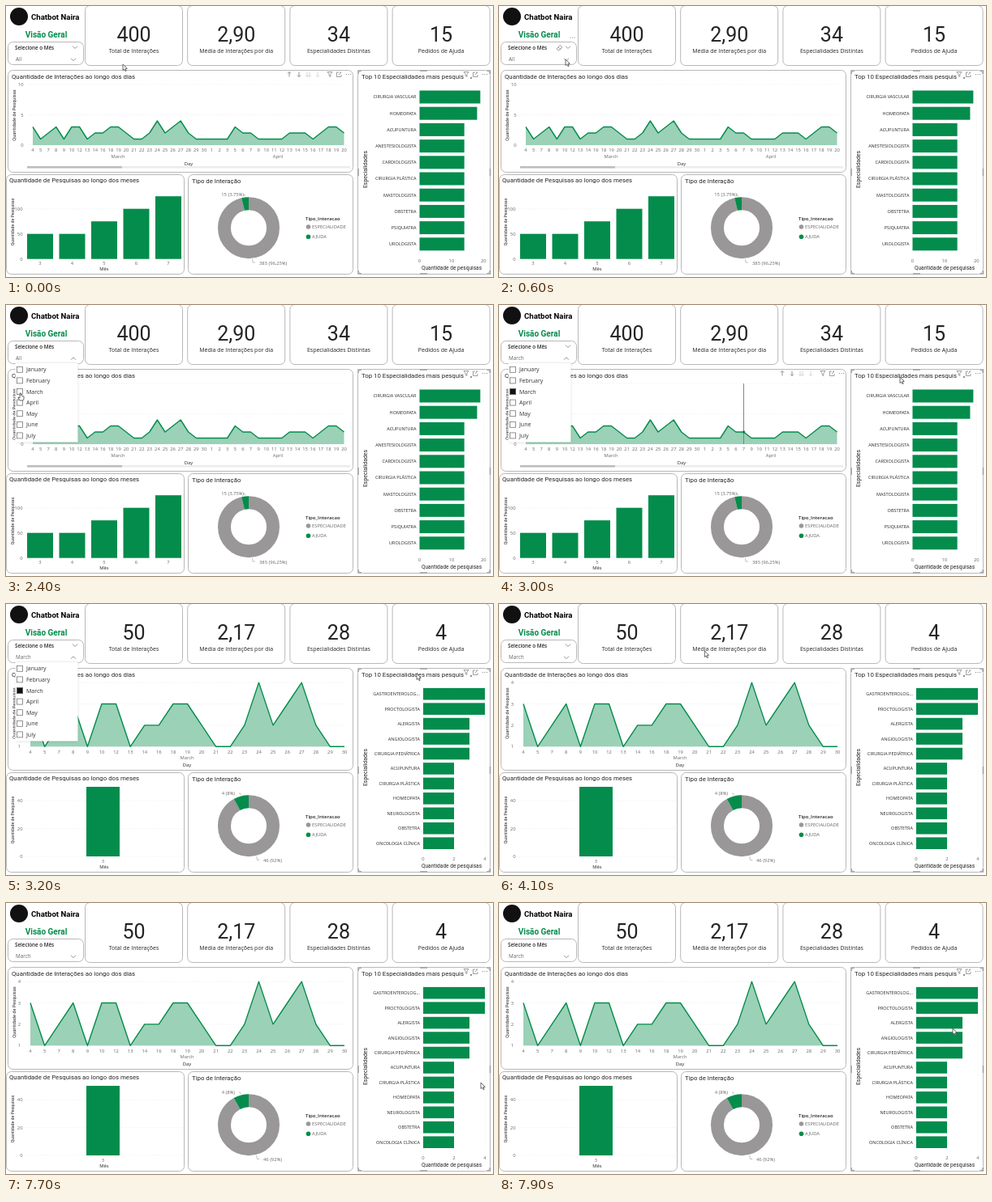
These frames come from a looping animation (600 by 335 pixels, 8000 ms). An HTML page with a canvas:

```html
<!DOCTYPE html>
<html lang="pt">
<head>
<meta charset="utf-8">
<title>Painel</title>
<style>
html, body { margin: 0; width: 100%; height: 100%; overflow: hidden; background: #fff; }
canvas { display: block; width: 600px; height: 335px; }
</style>
</head>
<body>
<canvas id="stage"></canvas>
<script>
const LOOP = 8000, STEP = 100;
const GREEN = '#048c4c', GREY = '#999797', INK = '#252423', SOFT = '#666', ICON = '#777';
const SANS = '"Open Sans", sans-serif', DIN = 'Roboto, sans-serif';
const canvas = document.getElementById('stage');
const ctx = canvas.getContext('2d');
const ratio = window.devicePixelRatio || 1;
canvas.width = 600 * ratio;
canvas.height = 335 * ratio;

const marchDays = [4, 5, 7, 8, 9, 10, 12, 13, 14, 16, 18, 19, 20, 21, 22, 23, 24, 25, 26, 27, 28, 29, 30];
const aprilDays = [1, 2, 3, 5, 6, 7, 9, 10, 11, 12, 13, 14, 15, 16, 17, 18, 19, 20];
const marchCounts = [...'31231331223321124234211'].map(Number);
const aprilCounts = [...'111322111122212332'].map(Number);
const months = ['January', 'February', 'March', 'April', 'May', 'June', 'July'];

const allData = {
  cards: ['400', '2,90', '34', '15'],
  days: [...marchDays, ...aprilDays], counts: [...marchCounts, ...aprilCounts],
  line: { x0: 33, x1: 416.5, base: 172, unit: 7.5, min: 0, ticks: [0, 5, 10], tickX: 21.5, dayY: 178.3, monthY: 186.3, titleY: 195, titleX: 225 },
  monthNames: [['March', 138], ['April', 335]],
  columns: { base: 312.7, unit: 0.62, ticks: [0, 50, 100], width: 32, centers: [42, 81.5, 121, 160.5, 200], values: [50, 50, 75, 100, 125] },
  help: 0.0375, helpLabel: ['15 (3,75%)', 294, 232.7], otherLabel: ['385 (96,25%)', 312, 317.5],
  bars: { x: 509.5, unit: 3.94, y: 112.5, pitch: 20.2, height: 16, ticks: [0, 10, 20], values: [19, 18, 14, 14, 14, 14, 14, 14, 14, 14],
    names: ['CIRURGIA VASCULAR', 'HOMEOPATA', 'ACUPUNTURA', 'ANESTESIOLOGISTA', 'CARDIOLOGISTA', 'CIRURGIA PLÁSTICA', 'MASTOLOGISTA', 'OBSTETRA', 'PSIQUIATRA', 'UROLOGISTA'] }
};
const marchData = {
  cards: ['50', '2,17', '28', '4'],
  days: marchDays, counts: marchCounts,
  line: { x0: 30, x1: 417, base: 176.3, unit: 26.4, min: 1, ticks: [1, 2, 3, 4], tickX: 18, dayY: 183, monthY: 190, titleY: 199, titleX: 223 },
  monthNames: [['March', 223]],
  columns: { base: 312, unit: 1.72, ticks: [0, 20, 40], width: 41, centers: [119.5], values: [50] },
  help: 0.08, helpLabel: ['4 (8%)', 283, 233.5], otherLabel: ['46 (92%)', 317, 317],
  bars: { x: 514, unit: 19, y: 111.2, pitch: 18.45, height: 14.6, ticks: [0, 2, 4], values: [4, 4, 3, 3, 3, 2, 2, 2, 2, 2, 2],
    names: ['GASTROENTEROLOG...', 'PROCTOLOGISTA', 'ALERGISTA', 'ANGIOLOGISTA', 'CIRURGIA PEDIÁTRICA', 'ACUPUNTURA', 'CIRURGIA PLÁSTICA', 'HOMEOPATA', 'NEUROLOGISTA', 'OBSTETRA', 'ONCOLOGIA CLÍNICA'] }
};

// y is the middle of the capital letters
function text(str, x, y, size, { color = INK, align = 'left', weight = 400, font = SANS } = {}) {
  ctx.font = `${weight} ${size}px ${font}`;
  ctx.fillStyle = color;
  ctx.textAlign = align;
  ctx.fillText(str, x, y + size * 0.36);
}
function sideText(str, x, y, size) {
  ctx.save();
  ctx.translate(x, y);
  ctx.rotate(-Math.PI / 2);
  text(str, 0, 0, size, { align: 'center', font: DIN });
  ctx.restore();
}
const title = (str, x, y) => text(str, x, y, 7.8, { font: DIN });
const tick = (str, x, y, align = 'center') => text(str, x, y, 5.8, { color: SOFT, align });

function rect(x, y, w, h, color) {
  ctx.fillStyle = color;
  ctx.fillRect(x, y, w, h);
}
function path(points, color, width = 0.8) {
  ctx.beginPath();
  points.forEach(([x, y]) => ctx.lineTo(x, y));
  ctx.strokeStyle = color;
  ctx.lineWidth = width;
  ctx.stroke();
}
function disc(x, y, r, color) {
  ctx.beginPath();
  ctx.arc(x, y, r, 0, Math.PI * 2);
  ctx.fillStyle = color;
  ctx.fill();
}
function panel(x0, y0, x1, y1) {
  ctx.beginPath();
  ctx.roundRect(x0 + 0.5, y0 + 0.5, x1 - x0, y1 - y0, 6);
  ctx.fillStyle = '#fff';
  ctx.fill();
  ctx.strokeStyle = '#b8b8b8';
  ctx.lineWidth = 1;
  ctx.stroke();
}
function grid(points) {
  ctx.setLineDash([1, 2]);
  path(points, '#e8e8e8', 0.7);
  ctx.setLineDash([]);
}
function chevron(x, y, up = false) {
  const d = up ? -1.5 : 1.5;
  path([[x - 3, y - d], [x, y + d], [x + 3, y - d]], ICON, 0.8);
}
function arrow(x, dir, color) {
  path([[x, 81.5], [x, 87.5]], color);
  path([[x - 2, 84.5 + dir], [x, 84.5 + dir * 3], [x + 2, 84.5 + dir]], color);
}
function dots(x, y) {
  for (const d of [-2.6, 0, 2.6]) disc(x + d, y, 0.6, ICON);
}
function visualIcons(x) {
  path([[x - 3, 81.5], [x + 3, 81.5], [x + 0.8, 84.5], [x + 0.8, 87.5], [x - 0.8, 86.5], [x - 0.8, 84.5], [x - 3, 81.5]], ICON, 0.7);
  path([[x + 11, 82], [x + 8.5, 82], [x + 8.5, 87.5], [x + 14, 87.5], [x + 14, 85]], ICON, 0.7);
  path([[x + 11, 85], [x + 14, 82], [x + 12, 82]], ICON, 0.7);
  dots(x + 23, 84.5);
}

function drawCards(values) {
  const labels = ['Total de Interações', 'Média de Interações por dia', 'Especialidades Distintas', 'Pedidos de Ajuda'];
  labels.forEach((label, i) => {
    const x = 157.5 + i * 126.2;
    panel(x - 60.5, -1, x + 59.5, 73);
    text(values[i], x, 35.3, 25, { align: 'center', font: DIN });
    text(label, x, 55.3, 7, { align: 'center' });
  });
}

function drawLine(data, hover) {
  const { x0, x1, base, unit, min, ticks, tickX, dayY, monthY, titleX, titleY } = data.line;
  panel(2, 79, 427, 205);
  title('Quantidade de Interações ao longo dos dias', 7, 86.7);
  sideText('Quantidade de Pesquisas', 9.5, 135, 5.6);
  const xAt = i => x0 + i * (x1 - x0) / (data.days.length - 1);
  const yAt = v => base - (v - min) * unit;
  for (const v of ticks) {
    grid([[x0 - 5, yAt(v)], [x1 + 4, yAt(v)]]);
    tick(v, tickX, yAt(v), 'right');
  }
  const points = data.counts.map((v, i) => [xAt(i), yAt(v)]);
  ctx.beginPath();
  [[x0, base], ...points, [x1, base]].forEach(([x, y]) => ctx.lineTo(x, y));
  ctx.fillStyle = '#9bd1b7';
  ctx.fill();
  ctx.lineJoin = 'round';
  path(points, GREEN, 1.4);
  ctx.lineJoin = 'miter';
  data.days.forEach((d, i) => tick(d, xAt(i), dayY));
  data.monthNames.forEach(([name, x]) => tick(name, x, monthY));
  text('Day', titleX, titleY, 5.8, { align: 'center' });
  if (!min) {
    for (const [end, color] of [[424, '#ececec'], [143, '#bdbdbd']])
      path([[26, 199.3], [end, 199.3]], color, 2.4);
  }
  if (hover) {
    arrow(349, -1, ICON);
    arrow(361, 1, ICON);
    arrow(371, 1, '#ccc');
    arrow(374, 1, '#ccc');
    arrow(384, 1, '#ccc');
    visualIcons(399);
  }
}

function drawColumns({ base, unit, ticks, width, centers, values }) {
  panel(0, 208, 219, 331);
  title('Quantidade de Pesquisas ao longo dos meses', 4, 215.3);
  sideText('Quantidade de Pesquisas', 8.5, 267, 5.2);
  for (const v of ticks) {
    grid([[24, base - v * unit], [217, base - v * unit]]);
    tick(v, 20.5, base - v * unit, 'right');
  }
  values.forEach((v, i) => {
    rect(centers[i] - width / 2, base - v * unit, width, v * unit, GREEN);
    tick(i + 3, centers[i], base + 5.5);
  });
  text('Mês', 121, 325.2, 5.8, { align: 'center' });
}

function drawDonut({ help, helpLabel, otherLabel }) {
  panel(224, 208, 427, 331);
  title('Tipo de Interação', 229, 216);
  const cx = 299, cy = 274.2;
  const top = -Math.PI / 2, split = top - help * Math.PI * 2;
  const ring = (from, to, color) => {
    ctx.beginPath();
    ctx.arc(cx, cy, 30, from, to);
    ctx.strokeStyle = color;
    ctx.lineWidth = 16;
    ctx.stroke();
  };
  ring(top, split + Math.PI * 2, GREY);
  ring(split, top, GREEN);
  const leader = (angle, dx, y) => {
    const c = Math.cos(angle), s = Math.sin(angle);
    path([[cx + 39 * c, cy + 39 * s], [cx + 42 * c, y], [cx + 42 * c + dx, y]], '#aaa', 0.7);
  };
  const mid = (split + top) / 2;
  leader(mid, -1.5, helpLabel[2] + 0.5);
  leader(mid + Math.PI, 3, otherLabel[2] - 0.5);
  const [h, hx, hy] = helpLabel, [o, ox, oy] = otherLabel;
  tick(h, hx - 1, hy, 'right');
  tick(o, ox, oy, 'left');
  text('Tipo_Interacao', 369, 263, 6, { weight: 600 });
  disc(372.5, 273, 2.8, GREY);
  tick('ESPECIALIDADE', 377, 273, 'left');
  disc(372.5, 285.2, 2.8, GREEN);
  tick('AJUDA', 377, 285.2, 'left');
}

function drawBars({ x, unit, y, pitch, height, ticks, values, names }) {
  panel(433, 79, 596, 331);
  const edge = '#a0a0a0';
  for (const cy of [80, 331]) {
    path([[510, cy], [519, cy]], edge, 1.6);
    for (const cx of [434, 596.5]) {
      const sx = cx < 500 ? 4 : -4, sy = cy < 200 ? 4 : -4;
      path([[cx + sx, cy], [cx, cy], [cx, cy + sy]], edge, 1.5);
    }
  }
  for (const cx of [434, 596.5]) path([[cx, 201], [cx, 210]], edge, 1.6);
  title('Top 10 Especialidades mais pesquis', 438, 86.7);
  path([[572, 89], [574, 89]], INK, 1);
  visualIcons(567);
  sideText('Especialidades', 442.2, 202, 6.9);
  for (const v of ticks) {
    grid([[x + v * unit, 102], [x + v * unit, 305]]);
    tick(v, x + v * unit, 314.5);
  }
  values.forEach((v, i) => {
    const cy = y + i * pitch;
    rect(x, cy - height / 2, v * unit, height, GREEN);
    text(names[i], x - 4, cy, 5.5, { align: 'right' });
  });
  text('Quantidade de pesquisas', 549, 324, 6.6, { align: 'center', font: DIN });
}

function drawSlicer(t, open, picked) {
  disc(16, 13, 11, '#111');
  text('Chatbot Naira', 31, 13.8, 9.6, { color: '#000', weight: 700, font: DIN });
  text('Visão Geral', 49.5, 35.7, 10, { color: GREEN, weight: 700, font: DIN, align: 'center' });
  panel(2, 44, 95, 72);
  text('Selecione o Mês', 11, 52, 6.25, { weight: 600 });
  text(picked ? 'March' : 'All', 12, 66.1, 6.3, { color: SOFT });
  chevron(83, 66.2, open);
  if (t < 1300 || (t >= 2800 && t < 4200)) chevron(85, 51);
  if (t >= 500 && t < 1300) {
    dots(90.5, 39);
    path([[71, 53], [75, 48.5], [78, 51], [74.5, 54.5], [72.5, 54.5], [71, 53]], ICON, 0.7);
    path([[73, 51], [76, 53.5]], ICON, 0.7);
  }
  if (!open) return;
  ctx.save();
  ctx.shadowColor = 'rgba(0,0,0,.15)';
  ctx.shadowBlur = 3 * ratio;
  rect(11.5, 72, 77, 97.5, '#fff');
  ctx.restore();
  months.forEach((name, i) => {
    const y = 79.8 + i * 13.6;
    if (picked && i === 2) rect(13, y - 4, 8, 8, '#111');
    ctx.strokeStyle = '#777';
    ctx.lineWidth = 0.8;
    ctx.strokeRect(13.5, y - 3.5, 7, 7);
    text(name, 25, y, 7, { color: '#333' });
  });
}

const route = [
  [0, 144, 72], [300, 112, 71], [600, 82, 66], [1000, 75, 73], [1400, 55, 92], [1800, 18, 109],
  [2800, 18, 109], [2900, 301, 125], [3000, 494, 89], [3200, 506, 86], [3600, 70, 60], [3700, 77, 67],
  [3900, 77, 67], [4500, 606, 40], [7600, 606, 260], [7700, 585, 222], [7800, 570, 182], [7900, 559, 155]
];
function pointerAt(t) {
  const i = route.findIndex(([time]) => time > t);
  if (i < 0) return route.at(-1).slice(1);
  const [t0, x0, y0] = route[i - 1], [t1, x1, y1] = route[i];
  const k = (t - t0) / (t1 - t0);
  return [x0 + (x1 - x0) * k, y0 + (y1 - y0) * k];
}
function drawPointer(t) {
  const [x, y] = pointerAt(t);
  ctx.save();
  ctx.translate(x, y);
  ctx.beginPath();
  const shape = t >= 1500 && t < 2900
    ? [[-1, 0], [0.5, 0], [0.8, 3], [4, 4], [4, 7], [3, 9], [-1, 9], [-3, 6], [-3, 5], [-1, 6]]
    : [[0, 0], [0, 7.5], [1.7, 6], [3, 8.7], [4.2, 8.1], [3, 5.5], [5.3, 5.3]];
  shape.forEach(p => ctx.lineTo(...p));
  ctx.closePath();
  ctx.fillStyle = '#fff';
  ctx.fill();
  ctx.strokeStyle = '#444';
  ctx.lineWidth = 0.8;
  ctx.stroke();
  ctx.restore();
}

function draw(t) {
  ctx.setTransform(ratio, 0, 0, ratio, 0, 0);
  rect(0, 0, 600, 335, '#fff');
  const data = t < 3100 ? allData : marchData;
  const crossing = t >= 2900 && t < 3100;
  drawCards(data.cards);
  drawLine(data, t < 300 || crossing);
  if (crossing) {
    path([[301.5, 97], [301.5, 172]], '#777', 0.9);
    disc(301.5, 157, 1.8, GREEN);
  }
  drawColumns(data.columns);
  drawDonut(data);
  drawBars(data.bars);
  drawSlicer(t, t >= 700 && t < 3900, t >= 2800);
  drawPointer(t);
}

function frame(now) {
  draw(Math.floor(now % LOOP / STEP) * STEP);
  requestAnimationFrame(frame);
}
requestAnimationFrame(frame);
</script>
</body>
</html>
```
